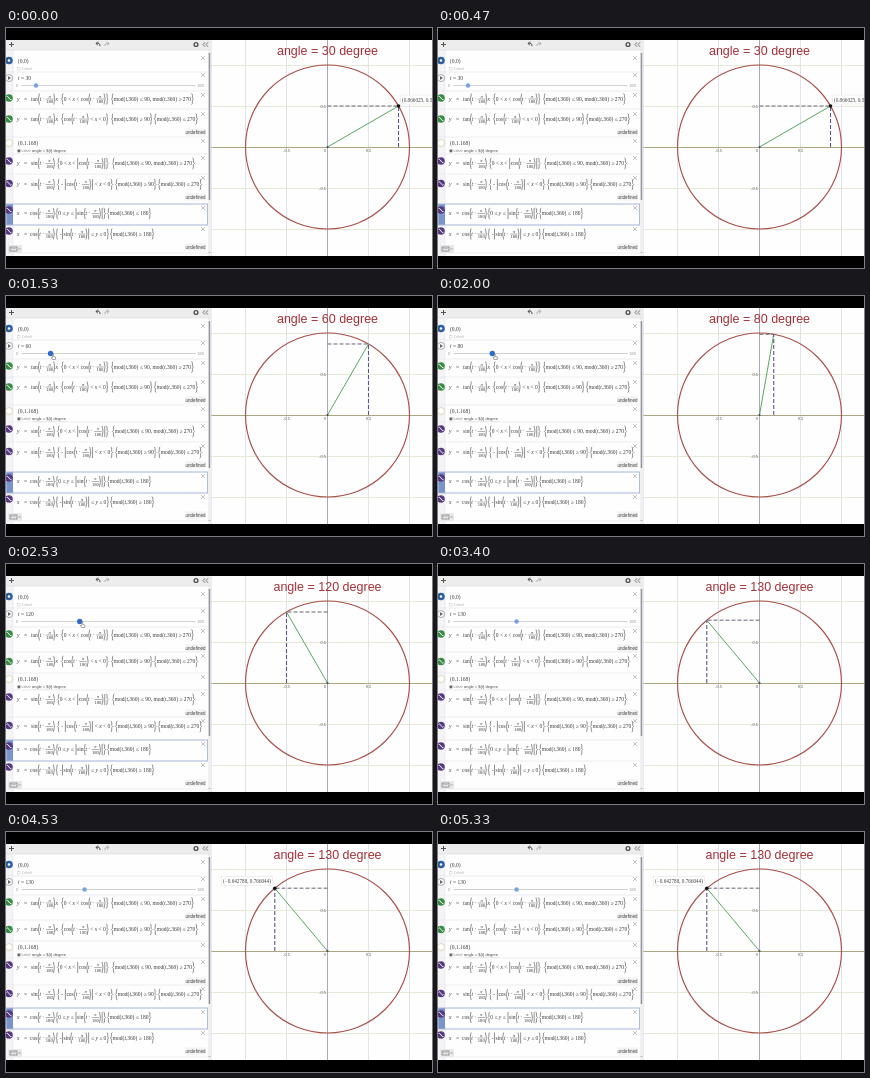
An HTML page with a canvas for the animation above (5.39 s loop, 426 px wide and 240 px high).

```html
<!DOCTYPE html>
<html lang="en">
<head>
<meta charset="utf-8">
<title>Unit circle</title>
<style>
html, body { margin: 0; width: 100%; height: 100%; overflow: hidden; background: #000; }
canvas { display: block; width: 426px; height: 240px; }
</style>
</head>
<body>
<canvas id="stage"></canvas>
<script>
const LOOP = 5390;
const canvas = document.getElementById('stage');
const c = canvas.getContext('2d');
const dpr = window.devicePixelRatio || 1;
canvas.width = 426 * dpr;
canvas.height = 240 * dpr;

const SERIF = '"Liberation Serif", "Times New Roman", serif';
const SANS = '"Liberation Sans", Arial, sans-serif';
const GREEN = '#388c46', PURPLE = '#573a82', RED = '#a8504a', INK = '#3c3c3c';
const CX = 321.5, CY = 119, R = 82;

const clamp = (v, lo, hi) => Math.min(hi, Math.max(lo, v));
const ease = p => p * p * (3 - 2 * p);

function box(x, y, w, h, color) {
  c.fillStyle = color;
  c.fillRect(x, y, w, h);
}

function frame(x, y, w, h, color, width) {
  c.strokeStyle = color;
  c.lineWidth = width;
  c.strokeRect(x, y, w, h);
}

function path(points, color, width = 1, dash = []) {
  c.beginPath();
  points.forEach(([x, y], i) => i ? c.lineTo(x, y) : c.moveTo(x, y));
  c.setLineDash(dash);
  c.strokeStyle = color;
  c.lineWidth = width;
  c.stroke();
  c.setLineDash([]);
}

function disc(x, y, r, fill, stroke, width = 1) {
  c.beginPath();
  c.arc(x, y, r, 0, Math.PI * 2);
  if (fill) { c.fillStyle = fill; c.fill(); }
  if (stroke) { c.strokeStyle = stroke; c.lineWidth = width; c.stroke(); }
}

function text(s, x, y, font, color, align = 'left') {
  c.font = font;
  c.fillStyle = color;
  c.textAlign = align;
  c.fillText(s, x, y);
  return c.measureText(s).width;
}

// Marks: F is the fraction, [ ] tall parentheses, { } tall braces, | tall bar.
const ANG = '[t · F]';

function tall(mark, x, y) {
  const h = 5.5;
  c.beginPath();
  if (mark === '[' || mark === ']') {
    const s = mark === '[' ? 1 : -1, a = x + (s > 0 ? 1.7 : 0.3);
    c.moveTo(a, y - h);
    c.quadraticCurveTo(a - 2 * s, y, a, y + h);
  } else if (mark === '|') {
    c.moveTo(x + 1, y - h);
    c.lineTo(x + 1, y + h);
  } else {
    const s = mark === '{' ? 1 : -1, m = x + 1.4;
    c.moveTo(m + s, y - h);
    c.quadraticCurveTo(m, y - h, m, y - 3.5);
    c.lineTo(m, y - 1);
    c.lineTo(m - s, y);
    c.lineTo(m, y + 1);
    c.lineTo(m, y + 3.5);
    c.quadraticCurveTo(m, y + h, m + s, y + h);
  }
  c.strokeStyle = '#4a4a4a';
  c.lineWidth = 0.6;
  c.stroke();
  return '{}'.includes(mark) ? 2.8 : 2;
}

function math(s, x, y) {
  for (const part of s.match(/[F[\]{}|]|[xyt]|[^F[\]{}|xyt]+/g)) {
    if (part === 'F') {
      text('π', x + 3.8, y - 1.3, `italic 4.6px ${SERIF}`, INK, 'center');
      path([[x, y], [x + 7.6, y]], '#666', 0.5);
      text('180', x + 3.8, y + 4.4, `4.6px ${SERIF}`, INK, 'center');
      x += 7.6;
    } else if ('[]{}|'.includes(part)) {
      x += tall(part, x, y);
    } else {
      const slant = 'xyt'.includes(part) ? 'italic ' : '';
      x += text(part, x, y + 1.8, `${slant}5.5px ${SERIF}`, INK);
    }
  }
}

function formula(y, left, parts) {
  math(left, 11, y);
  math('=', 18, y);
  parts.forEach(([x, s]) => math(s, x, y));
}

function close(y) {
  path([[195, y - 2], [199, y + 2]], '#aaa', 0.7);
  path([[199, y - 2], [195, y + 2]], '#aaa', 0.7);
}

function curveIcon(y, color) {
  disc(3, y, 3.8, color);
  c.beginPath();
  c.moveTo(0.6, y - 1);
  c.bezierCurveTo(2, y - 4, 4, y + 4, 5.6, y + 1);
  c.strokeStyle = '#fff';
  c.lineWidth = 1;
  c.stroke();
}

function undefinedTag(y) {
  box(179.5, y - 3.5, 20, 7, '#f2f2f3');
  text('undefined', 189.5, y + 1.5, `4.5px ${SANS}`, '#444', 'center');
}

function toolbar() {
  box(0, 12, 205, 10, '#ededed');
  path([[0, 22], [205, 22]], '#dcdcdc', 0.7);
  path([[3, 16.5], [8, 16.5]], '#555', 1);
  path([[5.5, 14], [5.5, 19]], '#555', 1);
  for (const [x, s] of [[92, 1], [101, -1]]) {
    const color = s > 0 ? '#444' : '#aaa';
    c.beginPath();
    c.moveTo(x - 2 * s, 15.5);
    c.quadraticCurveTo(x + 2 * s, 14, x + 2 * s, 18);
    c.strokeStyle = color;
    c.lineWidth = 1;
    c.stroke();
    path([[x, 13.5], [x - 2 * s, 15.5], [x, 17.3]], color, 0.9);
  }
  disc(190, 16.5, 1.9, null, '#555', 1.4);
  for (const x of [197, 200]) path([[x + 2, 14.3], [x, 16.5], [x + 2, 18.7]], '#555', 0.8);
}

function slider(a, drag) {
  const x = 15.4 + 0.486 * a;
  math('t', 12, 50);
  math('= ' + a, 15, 50);
  text('0', 10, 59, `4px ${SANS}`, '#999');
  text('360', 198, 59, `4px ${SANS}`, '#999', 'right');
  path([[15.4, 57.5], [190, 57.5]], '#d2d2d2', 1);
  disc(x, 57.5, drag ? 2.7 : 2.2, drag ? '#2f6cc8' : '#76a3e0');
}

function panel(a, drag, selected) {
  const wide = a > 90;
  const low = wide ? 97.5 : 91, low2 = wide ? 162.5 : 156.5;
  box(0, 22, 205, 206, '#fefefe');
  box(0, 22, 7, 206, '#f4f4f7');
  path([[7, 22], [7, 228]], '#e4e4ea', 0.6);
  for (const y of [44, 63, wide ? 88 : 81, 109, 126, wide ? 153 : 146, 176, 197, 225])
    path([[0, y], [202, y]], '#e6e6ec', 0.7);
  if (selected) {
    box(0, 176, 7, 21, '#7c94cc');
    frame(0.5, 176, 201, 21, '#a6b6da', 0.9);
  }

  disc(3, 32.5, 3.8, '#2d5e9e');
  disc(3, 32.5, 1.2, '#fff');
  disc(3, 50, 3.5, '#fff', '#999', 0.8);
  c.beginPath();
  c.moveTo(2, 48); c.lineTo(5, 50); c.lineTo(2, 52);
  c.fillStyle = '#666';
  c.fill();
  curveIcon(70, GREEN);
  curveIcon(low, GREEN);
  disc(3, 115, 3.5, '#fff', '#d4d0a0', 0.8);
  [133, low2 - 1, 182, 203].forEach(y => curveIcon(y, PURPLE));

  math('(0,0)', 12, 33);
  frame(11.5, 39.5, 2.6, 2.6, '#ccc', 0.5);
  text('Label', 16, 42.2, `4px ${SANS}`, '#b4b4b4');
  slider(a, drag);

  const mod = 'mod(t,360) ', both = `{${mod}≤ 90, ${mod}≥ 270}`;
  const split = `{${mod}≥ 90} {${mod}≤ 270}`;
  formula(71, 'y', [[25, `tan${ANG}x`], [55, `{0 < x < cos${ANG}}`], [105, both]]);
  formula(low, 'y', [[25, `tan${ANG}x`], [55, `{cos${ANG} < x < 0}`], [105, split]]);
  math('(0,1.168)', 12, 115);
  box(11.5, 121.5, 2.8, 2.8, '#666');
  text('Label:', 15.5, 124.3, `3.6px ${SANS}`, '#888');
  text('angle = ${t} degree', 26, 124.3, `4px ${SANS}`, '#444');
  path([[26, 125.2], [61, 125.2]], '#ccc', 0.4);
  formula(135.5, 'y', [[25, `sin${ANG}`], [51, `{0 < x < |cos${ANG}|}`], [106, both]]);
  formula(low2, 'y', [[25, `sin${ANG}`], [51, `{ - |cos${ANG}| < x < 0}`], [109, split]]);
  formula(185.5, 'x', [[24, `cos${ANG}`], [49.5, `{0 ≤ y ≤ |sin${ANG}|}`], [101, `{${mod}≤ 180}`]]);
  formula(206, 'x', [[24, `cos${ANG}`], [49.5, `{ -|sin${ANG}| ≤ y ≤ 0}`], [104, `{${mod}≥ 180}`]]);

  undefinedTag(wide ? 84 : 104);
  undefinedTag(wide ? 149 : 169);
  undefinedTag(219);
  [30, 47, 67, wide ? 92 : 86, 113, 130, wide ? 157 : 150, 180, 201].forEach(close);

  box(202, 22, 3, 206, '#f0f0f2');
  box(202.7, 25, 1.5, 147, '#94949e');
  path([[202.7, 224], [203.5, 225], [204.3, 224]], '#888', 0.6);
  box(2, 217, 14, 8, '#e8e8e8');
  frame(4, 219, 7, 4, '#777', 0.7);
  path([[5, 220.4], [10, 220.4]], '#777', 0.6, [1, 0.6]);
  path([[12.5, 221.5], [13.5, 220.3], [14.5, 221.5]], '#777', 0.6);
  toolbar();
}

function graph(a) {
  box(205, 12, 221, 216, '#fefefe');
  for (let k = -2; k <= 2; k++) {
    if (!k) continue;
    const d = k * R / 2;
    path([[CX + d, 12], [CX + d, 228]], '#e2e2ea', 1);
    path([[205, CY + d + 0.5], [426, CY + d + 0.5]], '#e8e8d8', 1);
  }
  path([[CX, 12], [CX, 228]], '#a9a7b8', 1);
  path([[205, CY + 0.5], [426, CY + 0.5]], '#aaa680', 1);
  path([[205, 12], [205, 228]], '#d4d4d4', 0.8);
  for (const k of [-1, 1]) {
    const n = (k < 0 ? '-' : '') + '0.5';
    text(n, CX + k * R / 2, CY + 4.5, `4px ${SANS}`, '#555', 'center');
    text(n, CX - 1.5, CY - k * R / 2 + 1.5, `4px ${SANS}`, '#555', 'right');
  }
  text('0', CX - 1.5, CY + 4.5, `4px ${SANS}`, '#555', 'right');

  const rad = a * Math.PI / 180;
  const x = CX + R * Math.cos(rad), y = CY - R * Math.sin(rad);
  disc(CX, CY, R, null, RED, 1.15);
  path([[CX, CY], [x, y]], '#58a85c', 1);
  path([[CX, y], [x, y]], '#6a6474', 1, [4, 2]);
  path([[x, CY], [x, y]], '#62548a', 1.1, [4, 2]);
  disc(CX, CY, 1.1, '#446');
  text(`angle = ${a} degree`, CX, 27.3, `12.5px ${SANS}`, '#a43036', 'center');
  return [x, y];
}

function tip(s, x, y, align) {
  const font = `5.2px ${SERIF}`;
  c.font = font;
  const w = c.measureText(s).width;
  const left = align === 'right' ? x - w : x;
  box(left - 1.5, y - 5, w + 3, 9, '#fff');
  frame(left - 1.5, y - 5, w + 3, 9, '#e0e0e0', 0.5);
  text(s, left, y + 1.6, font, INK);
}

function pointer(x, y) {
  c.beginPath();
  c.moveTo(x - 1, y - 2.5);
  c.lineTo(x, y - 2.5);
  c.lineTo(x, y);
  c.lineTo(x + 2.2, y + 0.5);
  c.lineTo(x + 1.8, y + 3);
  c.lineTo(x - 1.2, y + 3);
  c.lineTo(x - 2.2, y + 1);
  c.lineTo(x - 1, y + 1);
  c.closePath();
  c.fillStyle = '#fff';
  c.fill();
  c.strokeStyle = '#555';
  c.lineWidth = 0.5;
  c.stroke();
}

function draw(t) {
  const a = clamp(30 + 10 * Math.floor((t - 1030) / 166.7 + 0.001), 30, 130);
  const drag = t >= 1060 && t < 2900;
  const selected = t < 3000 || t >= 3900;
  c.setTransform(dpr, 0, 0, dpr, 0, 0);
  box(0, 0, 426, 240, '#000');
  const [x, y] = graph(a);
  if (t < 1030) {
    disc(x, y, 1.8, '#111');
    tip('(0.866025, 0.5)', 396, 72, 'left');
  } else if (t >= 3800) {
    disc(x, y, 1.8, '#111');
    tip('(−0.642788, 0.766044)', 265, 49.5, 'right');
  }
  panel(a, drag, selected);
  if (t > 500 && t < 3200) {
    const enter = 1 - ease(clamp((t - 500) / 300, 0, 1));
    const leave = ease(clamp((t - 2900) / 300, 0, 1));
    const off = t < 1030 ? 8 : 3;
    pointer(15.4 + 0.486 * a + off + 120 * (enter + leave), 60.5 + 12 * enter);
  }
  box(0, 0, 426, 12, '#000');
  box(0, 228, 426, 12, '#000');
}

const start = performance.now();
function tick() {
  draw((performance.now() - start) % LOOP);
  requestAnimationFrame(tick);
}
tick();
</script>
</body>
</html>
```
